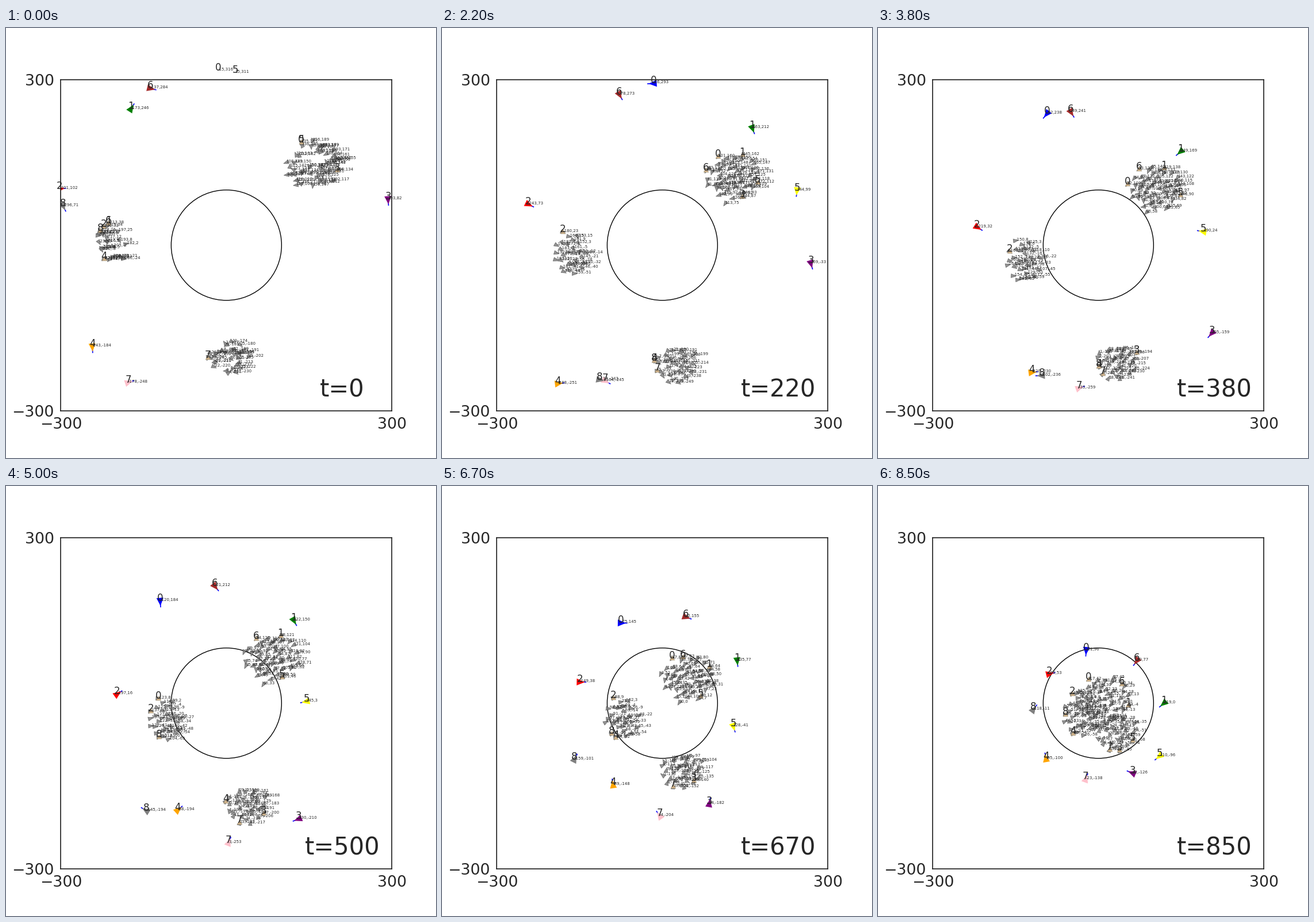
A matplotlib script for the animation above (8600 ms loop, 748 by 748 pixels).

```python
import numpy as np
import matplotlib.pyplot as plt
from matplotlib.animation import FuncAnimation
from matplotlib.collections import LineCollection, PolyCollection

SIZE, DPI, FRAMES, STEP = 748, 100, 86, 100
INK = "#262626"
UNIT = 600 / 576  # data units per pixel
T = np.arange(FRAMES)

plt.rcParams.update({"font.family": "DejaVu Sans", "text.color": INK,
                     "text.parse_math": False})

# Each dog circles the field through four way points
DOG_TIMES = [0, 22, 50, 85]
DOGS = {
    "blue": [(-15, 316), (-16, 293), (-120, 185), (-22, 96)],
    "green": [(-173, 247), (163, 212), (122, 150), (119, 0)],
    "red": [(-302, 102), (-243, 74), (-198, 16), (-89, 53)],
    "purple": [(293, 83), (269, -33), (131, -210), (62, -127)],
    "orange": [(-243, -184), (-189, -251), (-88, -194), (-95, -101)],
    "yellow": [(16, 312), (244, 99), (145, 3), (111, -96)],
    "brown": [(-138, 284), (-78, 273), (-21, 212), (70, 77)],
    "pink": [(-178, -249), (-104, -246), (4, -253), (-23, -138)],
    "gray": [(-296, 71), (-114, -244), (-145, -195), (-118, -12)],
}

# Each flock: head count, half width and height, centre at three times
FLOCK_TIMES = [0, 38, 85]
FLOCKS = [
    (52, (50, 43), [(155, 146), (103, 102), (8, 5)]),
    (29, (32, 38), [(-207, 4), (-136, -29), (-34, -24)]),
    (31, (39, 34), [(3, -203), (33, -213), (31, -54)]),
]


def smooth(times, values):
    """Cubic path through the values, sampled at every frame."""
    times, values = np.asarray(times, float), np.asarray(values, float)
    slope = np.gradient(values, times, axis=0)
    k = np.clip(np.searchsorted(times, T, "right") - 1, 0, len(times) - 2)
    h = (times[k + 1] - times[k])[:, None]
    u = (T - times[k])[:, None] / h
    return ((1 + 2 * u) * (1 - u) ** 2 * values[k] + u * (1 - u) ** 2 * h * slope[k]
            + u * u * (3 - 2 * u) * values[k + 1] + u * u * (u - 1) * h * slope[k + 1])


def course(path):
    step = np.gradient(path, axis=0)
    return np.unwrap(np.arctan2(step[:, 1], step[:, 0]))


def orbit(points):
    """Path that turns around the field centre rather than cutting across."""
    x, y = np.transpose(points)
    polar = np.stack([np.hypot(x, y), np.unwrap(np.arctan2(y, x))], axis=1)
    r, a = smooth(DOG_TIMES, polar).T
    return np.stack([r * np.cos(a), r * np.sin(a)], axis=1)


def disc(r, a):
    return np.stack([r * np.cos(a), r * np.sin(a)], axis=1)


def flock(n, half, centres, rng):
    """Positions and headings, each indexed by frame and sheep."""
    centre = smooth(FLOCK_TIMES, centres)
    k, t = np.arange(n), T[:, None]
    even = disc(np.sqrt((k + 0.5) / n), k * 2.39996) + rng.normal(0, 0.05, (n, 2))
    loose = disc(np.sqrt(rng.random(n)), rng.uniform(0, 2 * np.pi, n))
    phase = rng.uniform(0, 2 * np.pi, (n, 2))
    mix = np.exp(-t / 4)
    spot = even + mix[:, :, None] * (loose - even) + 0.05 * np.sin(t[:, :, None] / 5 + phase)
    spread = rng.normal(0, 0.5, n) * (1 + 3 * mix) + 0.2 * np.sin(t / 4 + phase[:, 0])
    return centre[:, None] + spot * half, course(centre)[:, None] + spread


def triangles(pos, angle, tip, tail, half):
    shape = np.array([(tip, 0), (-tail, half), (-tail, -half)]) * UNIT
    c, s = np.cos(angle)[:, None], np.sin(angle)[:, None]
    x, y = shape.T
    return pos[:, None] + np.stack([x * c - y * s, x * s + y * c], axis=-1)


rng = np.random.default_rng(7)
herd = [flock(*f, rng) for f in FLOCKS]
sheep_pos = np.concatenate([p for p, _ in herd], axis=1)
sheep_dir = np.concatenate([d for _, d in herd], axis=1)
paths = [orbit(p) for p in DOGS.values()]
dog_pos = np.stack(paths, axis=1)
dog_dir = np.stack([course(p) + 0.6 * np.sin(T / 2 + n) for n, p in enumerate(paths)], axis=1)

fig, ax = plt.subplots(figsize=(SIZE / DPI, SIZE / DPI), dpi=DPI, facecolor="white")
ax.set(xlim=(-300, 300), ylim=(-300, 300), xticks=[-300, 300], yticks=[-300, 300],
       aspect="equal")
ax.tick_params(length=0, pad=8.4, labelsize=19.25, labelcolor=INK)
for spine in ax.spines.values():
    spine.set(color=INK, linewidth=1.25)
ax.add_patch(plt.Circle((0, 0), 100, fill=False, edgecolor="black", linewidth=1))

sheep = PolyCollection([], facecolors=(0.5, 0.5, 0.5, 0.85), edgecolors=(0.25, 0.25, 0.25, 0.7),
                       linewidths=0.5, zorder=2)
marks, = ax.plot([], [], linestyle="none", marker=(3, 1, 0), markersize=7,
                 markerfacecolor="tan", markeredgecolor="#8f8468", markeredgewidth=0.4, zorder=2.3)
lines = LineCollection([], colors="blue", linewidths=1.2, zorder=2.4)
dogs = PolyCollection([], facecolors=list(DOGS), edgecolors="none", zorder=2.5)
for part in (sheep, lines, dogs):
    ax.add_collection(part)


def make_texts(count, size, **kw):
    return [ax.text(0, 0, "", fontsize=size, zorder=3, **kw) for _ in range(count)]


sheep_tags = make_texts(sheep_pos.shape[1], 5)
dog_tags = make_texts(len(DOGS), 5)
dog_names = make_texts(len(DOGS), 12, ha="center")
chase_names = make_texts(len(DOGS), 12, ha="center")
for names in (dog_names, chase_names):
    for n, text in enumerate(names):
        text.set_text(str(n))
clock = ax.text(210, -275, "", fontsize=30, ha="center", zorder=4)


def move(texts, points):
    for text, p in zip(texts, points):
        text.set_position(p)


def tag(texts, points):
    move(texts, points)
    for text, (x, y) in zip(texts, points):
        text.set_text(f"{int(x)},{int(y)}")


def update(i):
    flocked, pack = sheep_pos[i], dog_pos[i]
    sheep.set_verts(triangles(flocked, sheep_dir[i], 5, 3.8, 3.4))
    dogs.set_verts(triangles(pack, dog_dir[i], 8.5, 5.5, 6))
    ahead = disc(11 * UNIT, dog_dir[i])
    lines.set_segments(np.stack([pack, pack + ahead], axis=1))
    tag(sheep_tags, flocked)
    tag(dog_tags, pack)
    move(dog_names, pack)

    # every dog chases the sheep closest to it
    gaps = np.linalg.norm(pack[:, None] - flocked, axis=2)
    chased = flocked[gaps.argmin(axis=1)]
    marks.set_data(*chased.T)
    move(chase_names, chased)
    clock.set_text(f"t={10 * i}")
    return []


anim = FuncAnimation(fig, update, frames=FRAMES, interval=STEP, repeat=True,
                     repeat_delay=0, init_func=lambda: update(0), blit=False)
plt.show()
```
